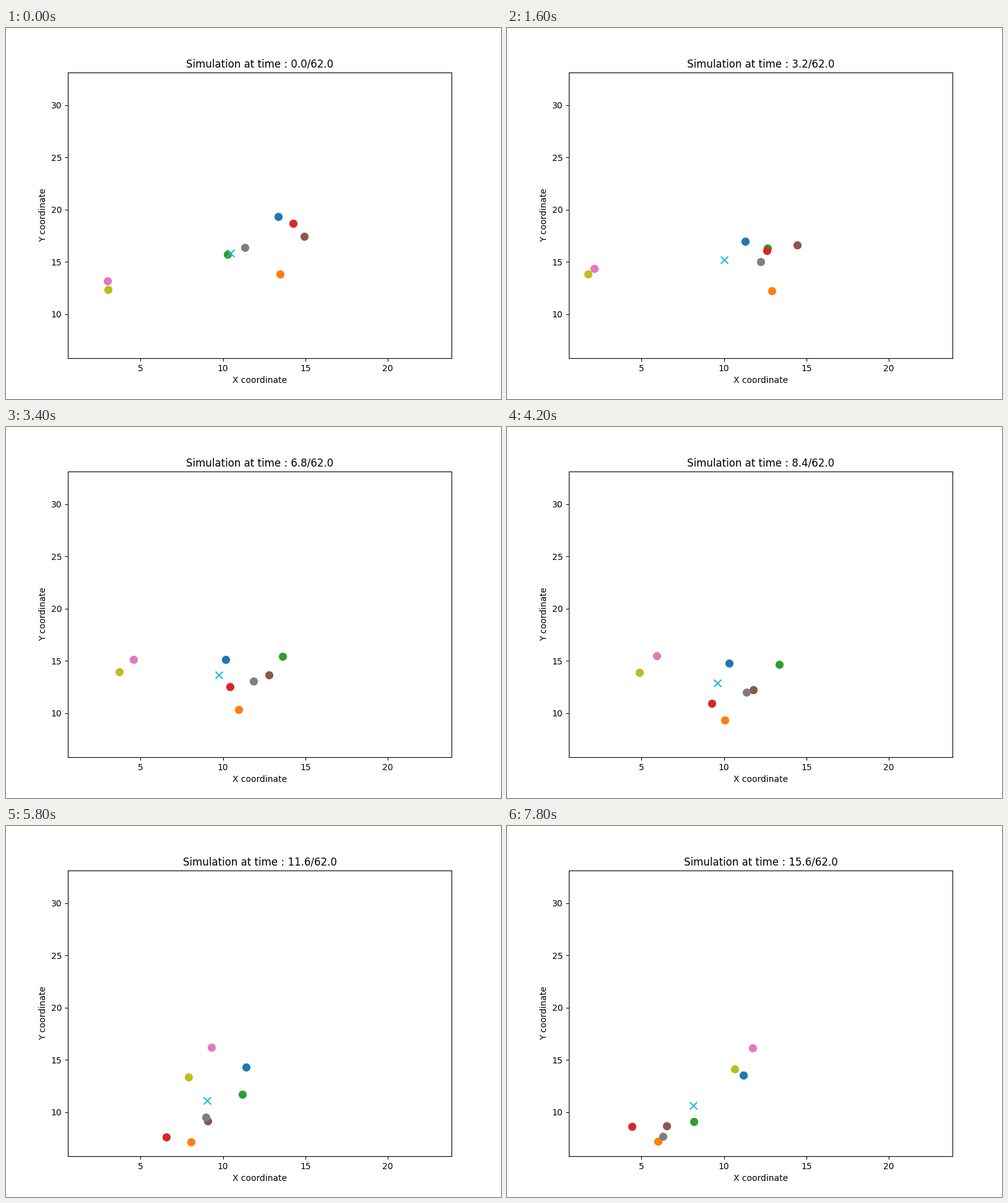
A matplotlib script for the animation above (8 s loop, 800 by 600 pixels).

```python
import numpy as np
import matplotlib.pyplot as plt
from matplotlib.animation import FuncAnimation

FRAMES = 40
INTERVAL = 200
STEP = 0.4
XLIM = (0.595, 23.86)
YLIM = (5.791, 33.131)
COLORS = [f"C{k}" for k in range(9) if k != 4]

# Way points (stage px) each body passes at the key frames
KEYS = np.array([0, 5, 18, 32, 39])
ROUTES = [
    [(440, 305), (400, 332), (355, 378), (392, 393), (382, 403)],
    [(443, 398), (437, 415), (370, 461), (281, 516), (244, 510)],
    [(358, 366), (408, 355), (447, 373), (358, 451), (302, 478)],
    [(464, 316), (438, 342), (355, 426), (237, 510), (202, 486)],
    [(482, 337), (477, 342), (419, 406), (302, 484), (258, 485)],
    [(164, 409), (134, 394), (214, 375), (358, 356), (397, 359)],
    [(386, 355), (411, 368), (398, 415), (299, 483), (252, 502)],
    [(165, 423), (126, 400), (190, 396), (322, 407), (368, 393)],
]


def glide(t, p, x):
    """Smooth path through points p at times t that never overshoots them."""
    h = np.diff(t).astype(float)
    s = np.diff(p, axis=0) / h[:, None, None]
    a, b = s[:-1], s[1:]
    same = a * b > 0
    inner = np.where(same, 2 * a * b / np.where(same, a + b, 1), 0)
    first = (3 * s[:1] - inner[:1]) / 2
    last = (3 * s[-1:] - inner[-1:]) / 2
    v = np.concatenate([first, inner, last])

    k = np.clip(np.searchsorted(t, x, side="right") - 1, 0, len(h) - 1)
    w = h[k][:, None, None]
    u = (x - t[k])[:, None, None] / w
    ease = u * u * (3 - 2 * u)
    return (p[k] + (p[k + 1] - p[k]) * ease
            + w * u * (1 - u) * (v[k] * (1 - u) - v[k + 1] * u))


def to_data(px):
    """Stage pixels (y down) to axes coordinates."""
    x = XLIM[0] + (px[..., 0] - 100) / 620 * (XLIM[1] - XLIM[0])
    y = YLIM[0] + (534 - px[..., 1]) / 462 * (YLIM[1] - YLIM[0])
    return np.stack([x, y], axis=-1)


points = np.array(ROUTES, float).swapaxes(0, 1)
paths = to_data(glide(KEYS, points, np.arange(FRAMES)))
center = paths.mean(axis=1)

fig, ax = plt.subplots(figsize=(8, 6), dpi=100)
ax.set_xlim(*XLIM)
ax.set_ylim(*YLIM)
ax.set_xticks(range(5, 21, 5))
ax.set_yticks(range(10, 31, 5))
ax.set_xlabel("X coordinate")
ax.set_ylabel("Y coordinate")
title = ax.set_title("")
dots = [ax.scatter(*p, s=72, color=c) for p, c in zip(paths[0], COLORS)]
cross = ax.scatter(*center[0], s=72, marker="x", color="C9")


def update(i):
    title.set_text(f"Simulation at time : {i * STEP:.1f}/62.0")
    for dot, p in zip(dots, paths[i]):
        dot.set_offsets(p)
    cross.set_offsets(center[i])
    return [title, cross, *dots]


anim = FuncAnimation(fig, update, frames=FRAMES, interval=INTERVAL,
                     repeat=True, repeat_delay=0)
plt.show()
```
